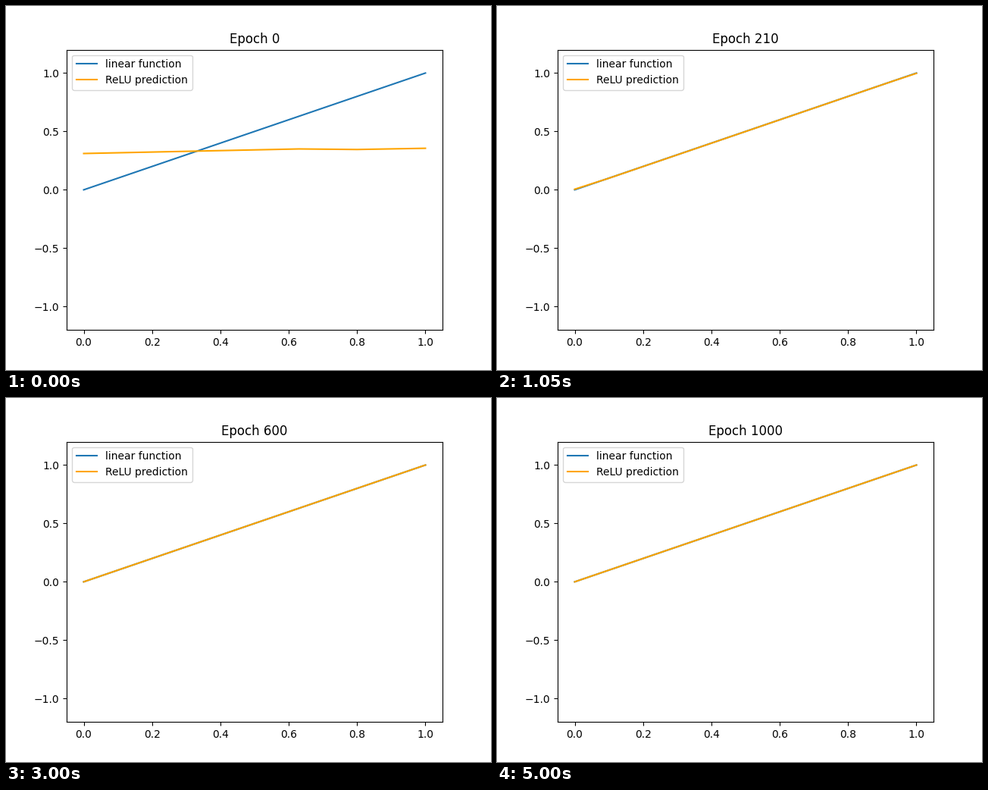
These frames come from a looping animation (640 by 480 pixels, 5050 ms). A matplotlib script:

```python
import numpy as np
import matplotlib.pyplot as plt
from matplotlib.animation import FuncAnimation

FRAMES = 101
INTERVAL = 50
EPOCHS_PER_FRAME = 10
FIT_EPOCH = 70      # by here only the bends at both ends are left
END_DECAY = 65      # epochs for the end bends to shrink by a factor e

x = np.linspace(0, 1, 101)


def relu(knee):
    return np.maximum(x - knee, 0)


untrained = 0.311 + 0.062 * x - 0.09 * relu(0.63) + 0.08 * relu(0.8)
nearly_fitted = 0.045 + 0.48 * x + 0.524 * relu(0.1) - 0.27 * relu(0.93)


def prediction(epoch):
    if epoch < FIT_EPOCH:
        weight = (1 - epoch / FIT_EPOCH) ** 2.2
        return nearly_fitted + (untrained - nearly_fitted) * weight
    return x + (nearly_fitted - x) * np.exp((FIT_EPOCH - epoch) / END_DECAY)


fig, ax = plt.subplots(figsize=(6.4, 4.8), dpi=100)
ax.plot(x, x, label="linear function")
fit, = ax.plot(x, prediction(0), color="orange", label="ReLU prediction")
ax.set_xlim(-0.05, 1.05)
ax.set_ylim(-1.2, 1.2)
ax.legend(loc="upper left")
title = ax.set_title("Epoch 0")


def update(frame):
    epoch = frame * EPOCHS_PER_FRAME
    fit.set_ydata(prediction(epoch))
    title.set_text(f"Epoch {epoch}")
    return fit, title


anim = FuncAnimation(fig, update, frames=FRAMES, interval=INTERVAL,
                     repeat=True, repeat_delay=0, blit=False)
plt.show()
```
